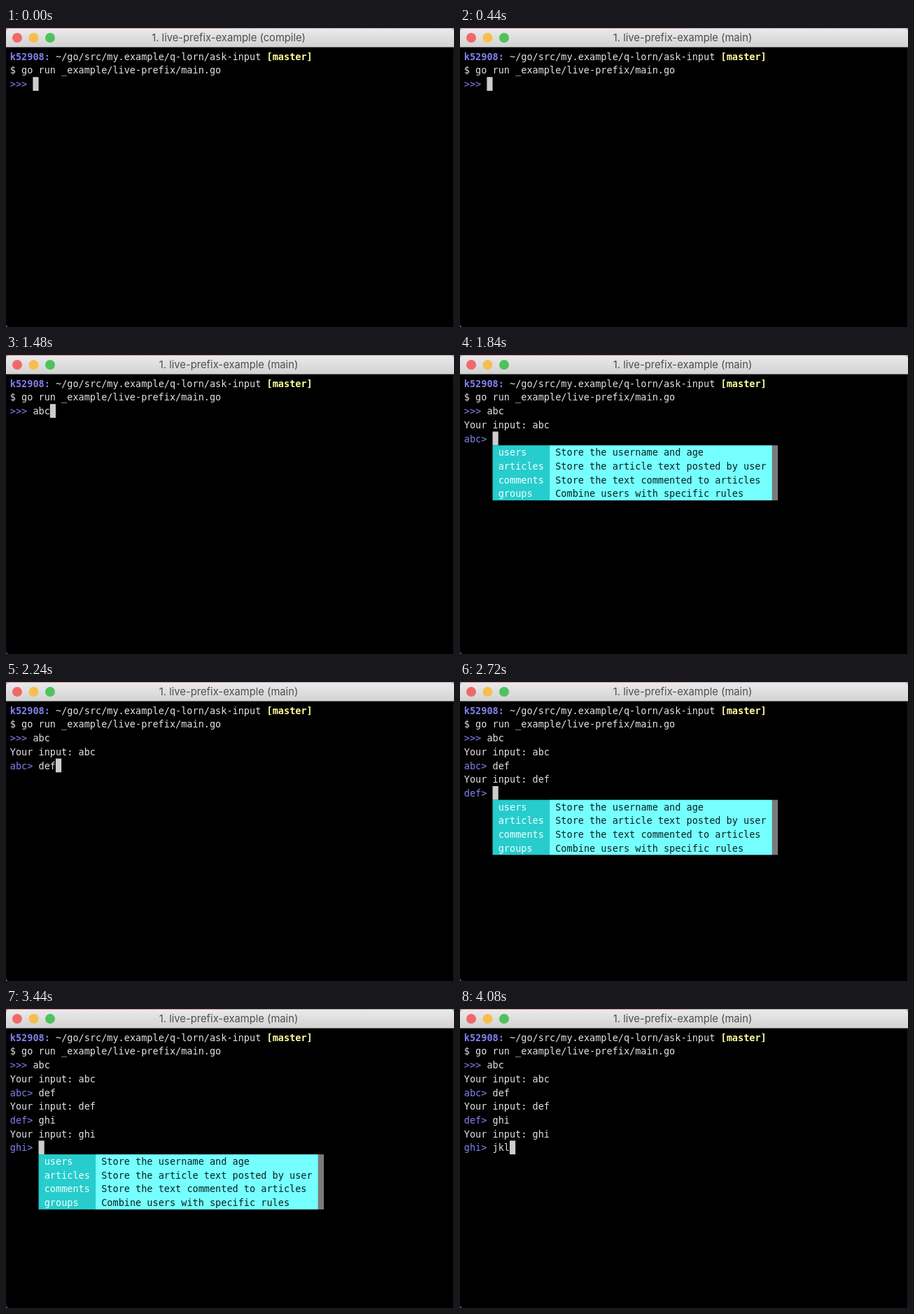
Animation of 640 by 428 pixels, one loop 4120 ms. Source, as an HTML page:

```html
<!DOCTYPE html>
<html lang="en">
<head>
<meta charset="utf-8">
<title>Terminal session</title>
<style>
  html, body { margin: 0; width: 100%; height: 100%; overflow: hidden; background: #000; }
  svg { display: block; width: 100vw; height: 100vh; }
  text { white-space: pre; }
  #screen { font: 13.54px "DejaVu Sans Mono", "Noto Sans Mono", monospace; }
  #title { font: 14.75px Inter, Roboto, sans-serif; fill: #4e4e4e; text-anchor: middle; }
</style>
</head>
<body>
<svg viewBox="0 0 640 428" preserveAspectRatio="none">
  <defs>
    <linearGradient id="bar" x2="0" y2="1">
      <stop stop-color="#ebeaeb"/>
      <stop offset="1" stop-color="#d3d2d3"/>
    </linearGradient>
  </defs>
  <rect width="640" height="428"/>
  <rect width="320" height="8" fill="#d4929a"/>
  <rect x="320" width="320" height="8" fill="#aaa"/>
  <path d="M0 27.5V6Q0 1 5 1H635Q640 1 640 6V27.5Z" fill="url(#bar)"/>
  <circle cx="16" cy="14" r="7" fill="#f0686a"/>
  <circle cx="39.5" cy="14" r="7" fill="#f6be4e"/>
  <circle cx="63" cy="14" r="7" fill="#4fc25c"/>
  <text id="title" x="318" y="19.4"></text>
  <path d="M0 423Q0 428 5 428H0Z" fill="#666"/>
  <path d="M639.5 28V428" stroke="#1c1c1c"/>
  <g id="screen"></g>
</svg>
<script>
const LOOP = 4120, MAIN_STARTS = 200;
const LEFT = 5.8, TOP = 30.8, COL = 8.15, ROW = 19.7;
const WHITE = '#e2e2e2', BLUE = '#8380ee', YELLOW = '#ffffa0';

// Key times for each entry; Enter submits it.
const ENTRIES = [
  { word: 'abc', keys: [920, 1040, 1160], enter: 1680 },
  { word: 'def', keys: [1960, 2040, 2160], enter: 2540 },
  { word: 'ghi', keys: [2800, 2920, 3040], enter: 3400 },
  { word: 'jkl', keys: [3680, 3780, 3880], enter: Infinity }
];
const SUGGESTIONS = [
  ['users', 'Store the username and age'],
  ['articles', 'Store the article text posted by user'],
  ['comments', 'Store the text commented to articles'],
  ['groups', 'Combine users with specific rules']
];

const title = document.getElementById('title');
const screen = document.getElementById('screen');
const escapeText = s => s.replace(/&/g, '&amp;').replace(/</g, '&lt;').replace(/>/g, '&gt;');

function write(row, col, str, fill = WHITE, weight = 400) {
  return `<text x="${LEFT + col * COL}" y="${TOP + row * ROW + 14.9}" fill="${fill}" font-weight="${weight}">${escapeText(str)}</text>`;
}

function block(row, col, cols, rows, fill) {
  return `<rect x="${LEFT + col * COL}" y="${TOP + row * ROW}" width="${cols * COL}" height="${rows * ROW}" fill="${fill}"/>`;
}

function menu(row) {
  return block(row, 5, 10, 4, '#27cccc') + block(row, 15, 39, 4, '#76ffff') +
    block(row, 54, 1, 4, '#7b7b7b') +
    SUGGESTIONS.map(([name, about], i) =>
      write(row + i, 6, name, '#f4ffff') + write(row + i, 16, about, '#0b2020')).join('');
}

function session(t) {
  let out = write(0, 0, 'k52908:', BLUE, 700) +
    write(0, 8, '~/go/src/my.example/q-lorn/ask-input') +
    write(0, 45, '[master]', YELLOW, 700) +
    write(1, 0, '$ go run _example/live-prefix/main.go');
  let row = 2, prompt = '>>>';
  for (const { word, keys, enter } of ENTRIES) {
    const typed = word.slice(0, keys.filter(k => t >= k).length);
    const start = prompt.length + 1;
    out += write(row, 0, prompt, BLUE) + write(row, start, typed);
    if (t < enter) {
      out += block(row, start + typed.length, 1, 1, '#cdcdcd');
      if (!typed && row > 2) out += menu(row + 1);
      break;
    }
    out += write(row + 1, 0, 'Your input: ' + word);
    row += 2;
    prompt = word + '>';
  }
  return out;
}

let shown = '';
function draw(t) {
  title.textContent = `1. live-prefix-example (${t < MAIN_STARTS ? 'compile' : 'main'})`;
  const next = session(t);
  if (next !== shown) screen.innerHTML = shown = next;
}

const begin = performance.now();
function tick() {
  draw((performance.now() - begin) % LOOP);
  requestAnimationFrame(tick);
}
tick();
</script>
</body>
</html>
```
